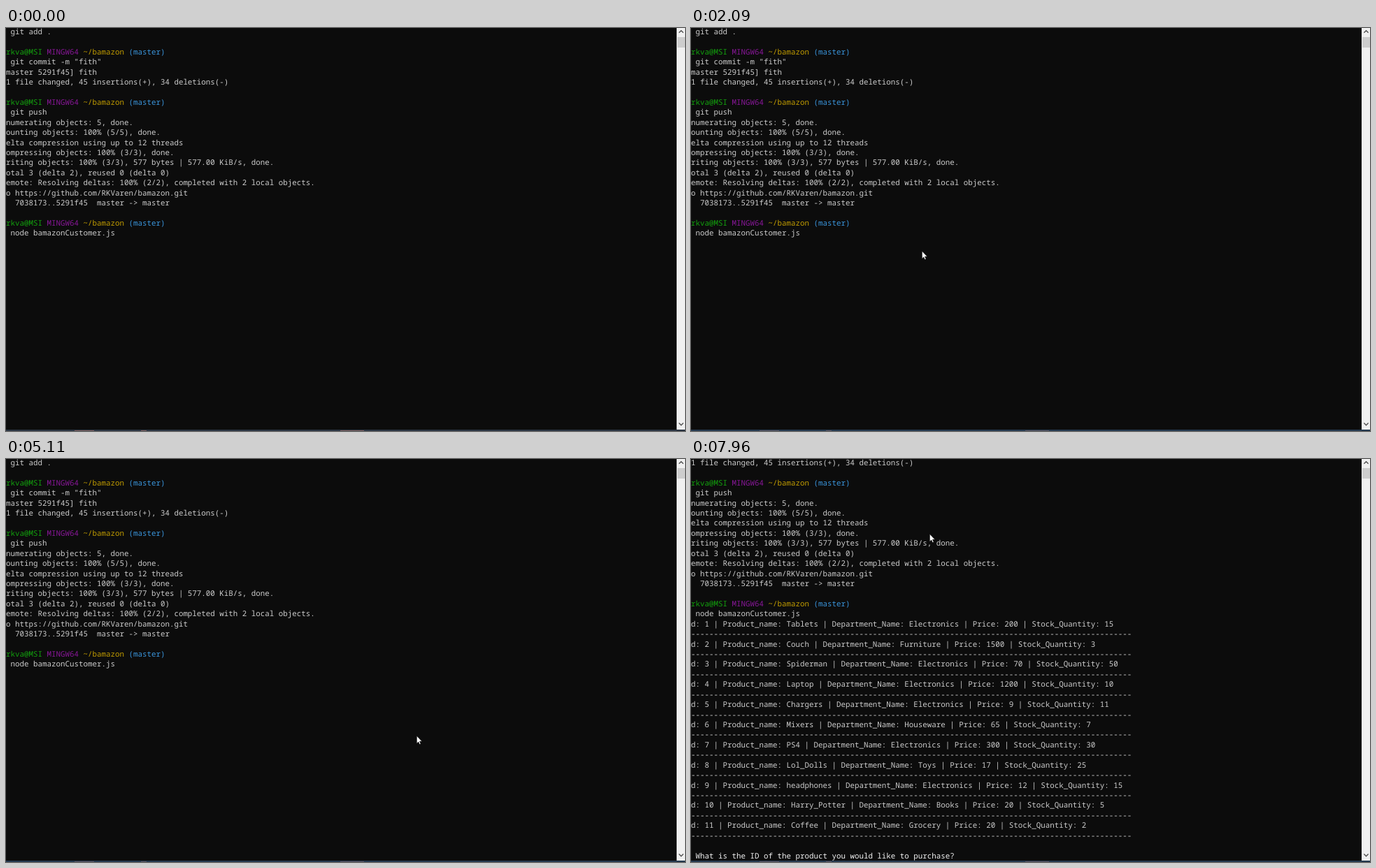
An HTML page for the animation above (8 s loop, 971 by 577 pixels).

```html
<!DOCTYPE html>
<html lang="en">
<head>
<meta charset="utf-8">
<title>Terminal</title>
<style>
  html, body { margin: 0; width: 100%; height: 100%; overflow: hidden; background: #0c0c0c; }
  svg { display: block; width: 100%; height: 100%; }
  text { font: 10.833px "Noto Sans Mono", "DejaVu Sans Mono", monospace; white-space: pre;
         fill: #ccc; text-rendering: geometricPrecision; }
</style>
</head>
<body>
<svg viewBox="0 0 971 577">
  <rect width="971" height="577" fill="#0c0c0c"/>
  <g id="lines"></g>
  <rect id="caret" width="6.5" height="3.6" fill="#fff"/>
  <g id="scrollbar">
    <rect x="959" width="12" height="575" fill="#f0f0f0"/>
    <rect x="960" y="13" width="11" height="15" fill="#cdcdcd"/>
    <path d="M962.4 6.8l3.1-3.1 3.1 3.1M962.4 565.6l3.1 3.1 3.1-3.1" fill="none" stroke="#505050" stroke-width="1.4"/>
  </g>
  <g id="edge">
    <rect id="border" y="575" width="971" height="2"/>
    <path id="spots" d="M98 576.5h28M193 576.5h8M478 576.5h34" stroke-width="1"/>
  </g>
  <path id="mouse" d="M.4.5V11.2L2.8 9 4.4 12.6 6.1 11.9 4.5 8.3H7.8Z" fill="#fff" stroke="#000" stroke-width=".5"/>
</svg>
<script>
const LOOP = 8000, COL = 6.5, ROW = 14.43, BASE = 8.8;
const $ = id => document.getElementById(id);

const PROMPT = [["rkva@MSI ", "#13a10e"], ["MINGW64 ", "#881798"], ["~/bamazon ", "#c19c00"], ["(master)", "#3a96dd"]];
const PRODUCTS = [
  ["Tablets", "Electronics", 200, 15],
  ["Couch", "Furniture", 1500, 3],
  ["Spiderman", "Electronics", 70, 50],
  ["Laptop", "Electronics", 1200, 10],
  ["Chargers", "Electronics", 9, 11],
  ["Mixers", "Houseware", 65, 7],
  ["PS4", "Electronics", 300, 30],
  ["Lol_Dolls", "Toys", 17, 25],
  ["headphones", "Electronics", 12, 15],
  ["Harry_Potter", "Books", 20, 5],
  ["Coffee", "Grocery", 20, 2]
];
const listing = PRODUCTS.flatMap(([name, dept, price, qty], i) => [
  `d: ${i + 1} | Product_name: ${name} | Department_Name: ${dept} | Price: ${price} | Stock_Quantity: ${qty}`,
  "-".repeat(97)
]);
const LINES = [
  " git add .", "",
  PROMPT, ' git commit -m "fith"', "master 5291f45] fith",
  "1 file changed, 45 insertions(+), 34 deletions(-)", "",
  PROMPT, " git push",
  "numerating objects: 5, done.",
  "ounting objects: 100% (5/5), done.",
  "elta compression using up to 12 threads",
  "ompressing objects: 100% (3/3), done.",
  "riting objects: 100% (3/3), 577 bytes | 577.00 KiB/s, done.",
  "otal 3 (delta 2), reused 0 (delta 0)",
  "emote: Resolving deltas: 100% (2/2), completed with 2 local objects.",
  "o https://github.com/RKVaren/bamazon.git",
  "  7038173..5291f45  master -> master", "",
  PROMPT, " node bamazonCustomer.js",
  ...listing, "",
  [[" What is the ID of the product you would like to purchase?", "#f2f2f2"]]
];

function svg(tag, attrs, parent) {
  const el = document.createElementNS("http://www.w3.org/2000/svg", tag);
  for (const key in attrs) el.setAttribute(key, attrs[key]);
  return parent.appendChild(el);
}

const rows = LINES.map((line, i) => {
  const text = svg("text", { x: 0, y: BASE + i * ROW }, $("lines"));
  if (typeof line === "string") text.textContent = line;
  else for (const [part, color] of line)
    svg("tspan", { style: "fill:" + color }, text).textContent = part;
  return text;
});

// Pointer moves: first step, last step, number of steps, way points
const MOVES = [
  [500, 890, 6, [[430, 560], [300, 380], [226, 259]]],
  [1060, 1440, 6, [[226, 259], [233, 342], [201, 280]]],
  [1860, 2490, 9, [[201, 280], [588, 396]]],
  [4430, 4430, 1, [[588, 396], [587, 396]]],
  [7470, 7960, 7, [[587, 396], [480, 3], [341, 107]]]
];
const BLINKS = [1440, 1960, 2490, 3060, 3550, 4080, 4600, 5110, 6520, 6690, 7240, 7770];

function along(points, p) {
  const s = p * (points.length - 1);
  const i = Math.min(Math.floor(s), points.length - 2);
  return points[i].map((v, k) => Math.round(v + (points[i + 1][k] - v) * (s - i)));
}

function pointer(t) {
  const move = MOVES.filter(m => t >= m[0]).pop();
  if (!move) return null;
  const [from, to, steps, points] = move;
  const gap = (to - from) / (steps - 1) || 1;
  const step = Math.min(steps, Math.floor((t - from) / gap + 1e-6) + 1);
  return along(points, step / steps);
}

function show(el, on) {
  el.setAttribute("visibility", on ? "visible" : "hidden");
}

function draw(t) {
  const full = t >= 6520, focused = t >= 890;
  const count = full ? rows.length : t >= 6440 ? 22 : 21;
  rows.forEach((row, i) => show(row, i < count && (!full || i >= 5)));
  $("lines").setAttribute("transform", `translate(0 ${full ? -5 * ROW : 0})`);

  show($("caret"), BLINKS.filter(b => t >= b).length % 2 === 1);
  $("caret").setAttribute("x", COL * (full ? 59 : 25));
  $("caret").setAttribute("y", BASE - 0.6 + ROW * (full ? 39 : 20));

  $("border").setAttribute("fill", focused ? "#24394f" : "#2a3442");
  $("spots").setAttribute("stroke", focused ? "#5c5560" : "#80605f");

  const at = pointer(t);
  show($("mouse"), at);
  if (at) $("mouse").setAttribute("transform", `translate(${at})`);
}

const start = performance.now();
function tick() {
  draw((performance.now() - start) % LOOP);
  requestAnimationFrame(tick);
}
tick();
</script>
</body>
</html>
```
